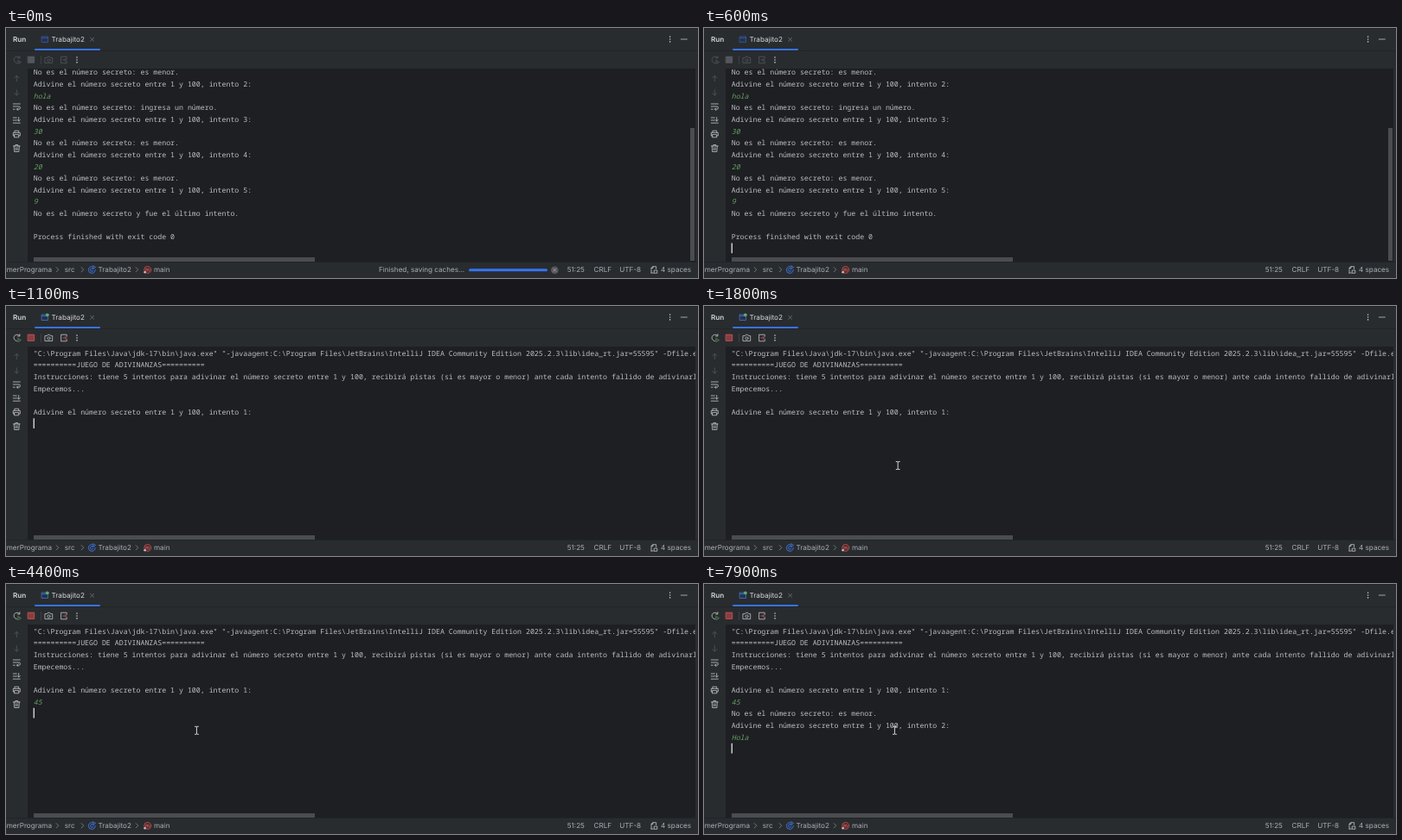
Animation of 800x290 px, one loop 8 s. Source, as an HTML page with a canvas:

```html
<!DOCTYPE html>
<html lang="es">
<head>
<meta charset="utf-8">
<title>Run</title>
<style>
  html, body { margin: 0; width: 100%; height: 100%; overflow: hidden; background: #292c2f; }
  body { position: relative; text-rendering: geometricPrecision; }
  #log, canvas, .ui { position: absolute; white-space: pre; }
  #log { left: 25px; top: 47px; width: 772px; height: 224px; overflow: hidden; background: #1e1f22; }
  #lines { position: absolute; left: 6.7px; font: 500 8.26px/13.64px "Noto Sans Mono", monospace;
    font-variant-ligatures: none; color: #bcbec4; }
  #lines i { color: #62a062; }
  .ui { font: 8.15px/12px Inter, sans-serif; color: #a9acb2; }
  .bright { color: #d6d8dc; }
  .bold { font-weight: 600; }
  canvas { left: 0; top: 0; }
</style>
</head>
<body>
<div id="log"><div id="lines"></div></div>
<canvas width="800" height="290"></canvas>
<script>
const LOOP = 8000, RESTART = 700, READY = 1000;
const ROW = 13.64, CHAR = 8.26 * 0.6;
const LIGHT = '#c4c6cb', DIM = '#55585d', BLUE = '#3574f0', RED = '#cf5656', GREEN = '#57965c', DARK = '#1e1f22';
const EDGE = '#222427', OUTLINE = '#4a7bdc', THUMB = '#4b4c4f';
const canvas = document.querySelector('canvas');
const ctx = canvas.getContext('2d');
const linesBox = document.getElementById('lines');

const ask = n => `Adivine el número secreto entre 1 y 100, intento ${n}:`;
const typed = s => `<i>${s}</i>`;
const LOWER = 'No es el número secreto: es menor.';

const previous = [
  LOWER, ask(2), typed('hola'),
  'No es el número secreto: ingresa un número.', ask(3), typed('30'),
  LOWER, ask(4), typed('20'),
  LOWER, ask(5), typed('9'),
  'No es el número secreto y fue el último intento.', '',
  'Process finished with exit code 0', ''
];
const command = String.raw`"C:\Program Files\Java\jdk-17\bin\java.exe" "-javaagent:C:\Program Files\JetBrains\IntelliJ IDEA Community Edition 2025.2.3\lib\idea_rt.jar=55595" -Dfile.encoding=UTF-8`;
const intro = [
  '==========JUEGO DE ADIVINANZAS==========',
  'Instrucciones: tiene 5 intentos para adivinar el número secreto entre 1 y 100, recibirá pistas (si es mayor o menor) ante cada intento fallido de adivinarlo.',
  'Empecemos...', '', ask(1)
];

const first = { text: '45', keys: [3400, 3700], enter: 4000 };
const second = { text: 'Hola', keys: [6400, 6900, 7000, 7200], enter: 7800 };
const REPLY = 4600;

// Spans of time in which the caret is lit
const caretOn = [[300, 1700], [2200, 2700], [3200, 5200], [5700, 6300], [6400, LOOP]];

function label(text, x, y, cls = '') {
  const el = document.createElement('div');
  el.className = 'ui ' + cls;
  el.textContent = text;
  el.style.left = x + 'px';
  el.style.top = y - 6 + 'px';
  document.body.insertBefore(el, canvas);
  return el;
}

const NAME = 'Trabajito2';
label('Run', 8, 13, 'bright bold');
label(NAME, 52.5, 13, 'bright');
const project = label('PrimerPrograma', 0, 280);
project.style.left = 'auto';
project.style.right = 'calc(100% - 53px)';
label('src', 67.7, 280);
label(NAME, 106.5, 280);
label('main', 171, 280);
const saving = label('Finished, saving caches...', 431, 280);
label('51:25', 648.7, 280);
label('CRLF', 679.6, 280);
label('UTF-8', 709.3, 280);
label('4 spaces', 757, 280);

function pen(x, y, d, color, width = 0.8) {
  ctx.save();
  ctx.translate(x, y);
  ctx.strokeStyle = color;
  ctx.lineWidth = width;
  ctx.lineCap = ctx.lineJoin = 'round';
  ctx.stroke(new Path2D(d));
  ctx.restore();
}

function box(x, y, w, h, color, r = 0) {
  ctx.fillStyle = color;
  ctx.beginPath();
  ctx.roundRect(x, y, w, h, r);
  ctx.fill();
}

function dot(x, y, r, color) {
  ctx.fillStyle = color;
  ctx.beginPath();
  ctx.arc(x, y, r, 0, 7);
  ctx.fill();
}

function kebab(x, y) {
  for (const dy of [-2.9, 0, 2.9]) dot(x, y + dy, 0.8, LIGHT);
}

function drawHeader(running) {
  box(0, 0, 800, 1, EDGE);
  box(0, 26, 800, 1, EDGE);
  box(33, 24, 76, 2, BLUE, 1);
  box(41.5, 9.5, 7.5, 7.5, '#25324d', 1);
  pen(45, 13.2, 'M-3.5 -3.2H3.5V3.3H-3.5ZM-3.5 -1.6H3.5', running ? OUTLINE : '#3a60ab', 0.7);
  if (running) dot(47.8, 10.3, 1.9, '#5fad65');
  pen(99.6, 13.3, 'M-2 -2L2 2M2 -2L-2 2', '#7c8087', 0.7);
  kebab(767.6, 13);
  pen(783.8, 13, 'M-3.5 0H3.5', LIGHT);
}

function drawToolbar(running, ready) {
  const main = running ? LIGHT : DIM;
  pen(13, 37, 'M2.6 -2.7A3.8 3.8 0 1 0 -0.6 3.7M2.9 -4.3V-2H0.6', main);
  pen(13, 37, 'M1.2 0.8L4.4 2.6L1.2 4.4Z', running ? GREEN : DIM);
  box(25.3, 33, 7.6, 7.6, running ? '#8a3d40' : '#53565b', 1);
  pen(29.1, 36.8, 'M-3.6 -3.6H3.6V3.6H-3.6Z', running ? RED : DIM);
  box(40, 32, 1, 10, '#3c3e43');
  pen(49.5, 37, 'M-4.2 -2.4H-2L-1.2 -3.7H1.2L2 -2.4H4.2V3.6H-4.2ZM1.6 .5A1.6 1.6 0 1 1 -1.6 .5A1.6 1.6 0 1 1 1.6 .5', main);
  if (running && !ready) return kebab(66, 37);
  pen(67, 37, 'M3.2 -1.6V-3.8H-3.4V3.8H3.2V1.6', main);
  pen(67, 37, 'M-1.2 0H2.6M1.1 -1.5L2.6 0L1.1 1.5', running ? RED : DIM);
  kebab(82, 37);
}

function drawSidebar(canPrint) {
  pen(12.3, 58.5, 'M0 3.2V-3M-2.6 -.6L0 -3.2L2.6 -.6', DIM);
  pen(12.3, 75, 'M0 -3.2V3M-2.6 .6L0 3.2L2.6 .6', DIM);
  pen(12.3, 91, 'M-4 -3H4M-4 0H2.6A1.6 1.6 0 0 1 2.6 3.2H.2M1.6 1.8L.2 3.2L1.6 4.6M-4 3.2H-2', LIGHT);
  pen(12.3, 107, 'M-4 -3H0M-4 0H0M-4 3.2H4M2.4 -3.4V1M.8 -.5L2.4 1.1L4 -.5', LIGHT);
  pen(12.3, 123, 'M-2.4 -1.6V-3.8H2.4V-1.6M-2.4 2H-4V-1.6H4V2H2.4M-2.4 .6H2.4V3.8H-2.4Z', canPrint ? LIGHT : DIM);
  pen(12.3, 139.5, 'M-3.8 -2.6H3.8M-1.4 -2.6V-4H1.4V-2.6M-3 -2.6L-2.6 4H2.6L3 -2.6M-.9 -.6V2.2M.9 -.6V2.2', LIGHT);
}

function drawStatus(busy) {
  box(0, 271, 800, 1, EDGE);
  for (const x of [59.5, 88.5, 151.5]) pen(x, 280.3, 'M-1.3 -2.6L1.3 0L-1.3 2.6', '#868a91');
  dot(99.3, 280.5, 4, '#25324d');
  pen(99.3, 280.5, 'M4 0A4 4 0 1 1 0 -4M1.4 1.2A1.8 1.8 0 1 1 1.4 -1.2', OUTLINE);
  pen(102, 277.5, 'M-1 -1.6L1.6 0L-1 1.6Z', OUTLINE);
  dot(163.7, 280.5, 4, '#4a2b2d');
  pen(163.7, 280.5, 'M4 0A4 4 0 1 1 0 -4A4 4 0 0 1 4 0M-1.8 1.6V-1M-1.8 -.4A.9 .9 0 0 1 0 -.2V1.6M0 -.2A.9 .9 0 0 1 1.8 -.2V1.6', RED);
  dot(160.6, 283.3, 1.3, LIGHT);
  pen(749, 280.5, 'M-3 3.6V-2.2L-1.2 -3.8H2.6V-1M-3 3.6H-.6M-1 -3.6V-2H-2.8M.6 .6H3.8V3.8H.6Z', LIGHT);
  if (!busy) return;
  box(535, 279.3, 91, 3, BLUE, 1.5);
  dot(634.3, 280.8, 4.4, '#54575c');
  pen(634.3, 280.8, 'M-1.6 -1.6L1.6 1.6M1.6 -1.6L-1.6 1.6', '#a4a7ac');
}

function entered(input, t) {
  return input.text.slice(0, input.keys.filter(k => t >= k).length);
}

// Text on screen, with the row and column of the caret
function consoleAt(t) {
  if (t < RESTART) return { lines: previous, row: 15, col: 0 };
  const lines = [command];
  let col = 0;
  const prompt = input => {
    const text = entered(input, t);
    lines.push(typed(text));
    col = text.length;
    if (t >= input.enter) {
      lines.push('');
      col = 0;
    }
  };
  if (t < READY) lines.push('');
  else {
    lines.push(...intro);
    prompt(first);
    if (t >= REPLY) {
      lines.pop();
      lines.push(LOWER, ask(2));
      prompt(second);
    }
  }
  return { lines, row: lines.length - 1, col };
}

const mix = (a, b, k) => a + (b - a) * k;
const span = (t, a, b) => Math.min(1, Math.max(0, (t - a) / (b - a)));
const ease = k => 1 - (1 - k) ** 3;

function drawPointer(t) {
  if (t < 1300) return;
  const enter = ease(span(t, 1300, 1700));
  const settle = ease(span(t, 1800, 2100));
  const x = mix(mix(300, 224.2, enter), 220.4, settle);
  const y = mix(mix(40, 185.2, enter), 169.8, settle);
  ctx.save();
  ctx.beginPath();
  ctx.rect(25, 47, 772, 224);
  ctx.clip();
  pen(x, y, 'M-2 -4.5H-.6L0 -4L.6 -4.5H2M0 -4V4M-2 4.5H-.6L0 4L.6 4.5H2', '#e8e8e8', 0.9);
  ctx.restore();
}

let shown = '';
function render(t) {
  const running = t >= RESTART, busy = t < 100;
  const top = running ? 48.8 : 45.4;
  const { lines, row, col } = consoleAt(t);
  const html = lines.join('\n');
  if (html !== shown) {
    linesBox.innerHTML = shown = html;
    linesBox.style.top = top - 47 + 'px';
  }
  saving.style.visibility = busy ? 'visible' : 'hidden';

  ctx.clearRect(0, 0, 800, 290);
  drawHeader(running);
  drawToolbar(running, t >= READY);
  drawSidebar(!running || t >= READY);
  drawStatus(busy);
  box(32, 266, 325, 5, THUMB);
  if (!running) box(791, 116, 5, 154, THUMB);
  if (caretOn.some(([a, b]) => t >= a && t < b)) {
    box(31.6 + col * CHAR, top + row * ROW - 0.5, 1.3, 11.8, '#dfe1e5');
  }
  drawPointer(t);
}

const start = performance.now();
function tick() {
  render((performance.now() - start) % LOOP);
  requestAnimationFrame(tick);
}
tick();
</script>
</body>
</html>
```
